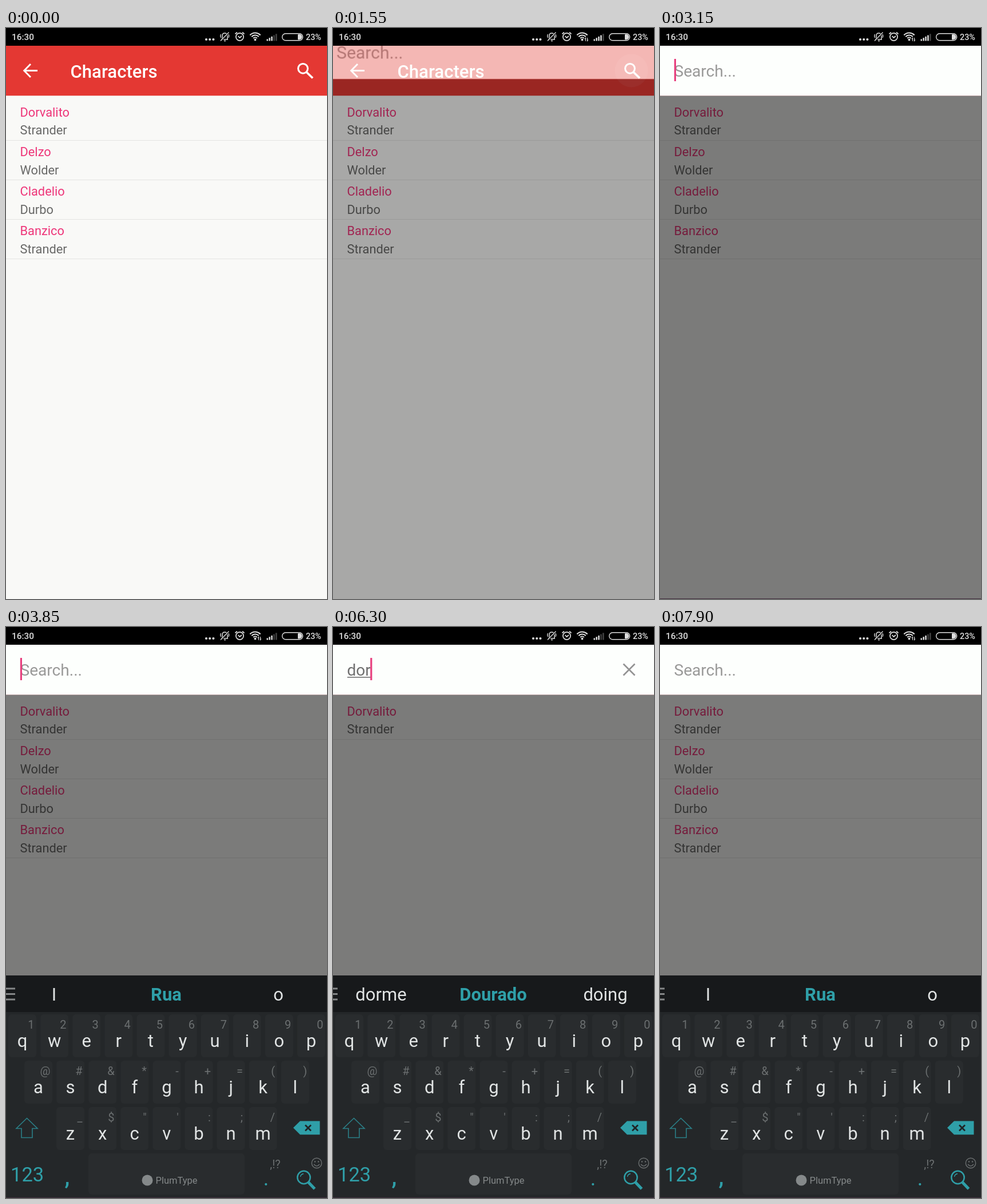
Write an HTML page with a canvas that moves like this. It is 561 px wide and 998 px high and loops after 8 s.

```html
<!DOCTYPE html>
<html lang="en">
<head>
<meta charset="utf-8">
<title>Character search</title>
<style>
  html, body { margin: 0; width: 100%; height: 100%; overflow: hidden; background: #000; }
  canvas { display: block; width: 561px; height: 998px; }
</style>
</head>
<body>
<canvas id="stage"></canvas>
<script>
const W = 561, H = 998, LOOP = 8000;
const BAR_TOP = 31, BAR_H = 87.3, BAR_MID = BAR_TOP + BAR_H / 2;
const dpr = window.devicePixelRatio || 1;

function setup(canvas, w, h) {
  canvas.width = w * dpr;
  canvas.height = h * dpr;
  const c = canvas.getContext('2d');
  c.scale(dpr, dpr);
  return c;
}

const screen = setup(document.getElementById('stage'), W, H);
const panel = setup(document.createElement('canvas'), W, 120);
let ctx = screen;

const TEAL = '#2f9fa8', PINK = '#ee3679', GREY = '#6b6f70';
const PEOPLE = [
  ['Dorvalito', 'Strander'],
  ['Delzo', 'Wolder'],
  ['Cladelio', 'Durbo'],
  ['Banzico', 'Strander']
];
// Each edit: time and resulting query
const EDITS = [[2700, ''], [4450, 'd'], [4900, 'do'], [5300, 'dor'],
               [6700, 'do'], [6950, 'd'], [7200, '']];
const WORDS = {
  '': ['I', 'Rua', 'o'],
  d: ['de', 'Da', 'do'],
  do: ['do', 'Dois', 'dos'],
  dor: ['dorme', 'Dourado', 'doing']
};
const KEY_ROWS = [
  { keys: 'qwertyuiop', hints: '1234567890', x: 28.5, y: 677 },
  { keys: 'asdfghjkl', hints: '@#&*-+=()', x: 56.5, y: 758 },
  { keys: 'zxcvbnm', hints: '_$"\':;/', x: 112.5, y: 839 }
];

const clamp = v => Math.max(0, Math.min(1, v));
const span = (t, from, to) => clamp((t - from) / (to - from));
const smooth = v => (1 - Math.cos(Math.PI * v)) / 2;

function rect(x, y, w, h, color) {
  ctx.fillStyle = color;
  ctx.fillRect(x, y, w, h);
}

function roundRect(x, y, w, h, r, color) {
  ctx.beginPath();
  ctx.roundRect(x, y, w, h, r);
  ctx.fillStyle = color;
  ctx.fill();
}

function disc(x, y, r, color) {
  ctx.beginPath();
  ctx.arc(x, y, r, 0, 7);
  ctx.fillStyle = color;
  ctx.fill();
}

function ring(x, y, r, color, width) {
  ctx.beginPath();
  ctx.arc(x, y, r, 0, 7);
  ctx.strokeStyle = color;
  ctx.lineWidth = width;
  ctx.stroke();
}

function stroke(d, color, width) {
  ctx.strokeStyle = color;
  ctx.lineWidth = width;
  ctx.stroke(new Path2D(d));
}

function text(s, x, y, size, color, weight = 400, align = 'left') {
  ctx.font = `${weight} ${size}px Roboto, sans-serif`;
  ctx.textAlign = align;
  ctx.fillStyle = color;
  ctx.fillText(s, x, y);
}

function drawStatus(t) {
  const c = '#dedede';
  const strong = t >= 650 && t < 3550;
  const traffic = (t >= 200 && t < 5000) || t >= 6650;
  rect(0, 0, W, BAR_TOP, '#000');
  text('16:30', 10, 21, 15.4, c, 500);
  for (let i = 0; i < 3; i++) disc(350 + i * 6.2, 20, 2.1, c);

  // Muted bell
  stroke('M376 20H388M378 20V14Q378 9 382 9Q387 9 387 14V20M381 22.5H384', c, 1.5);
  stroke('M375.5 23L390 7', '#000', 3);
  stroke('M375 22.5L389.5 7.5M375.5 11Q374 14 375.5 17M389 11Q390.5 14 389 17', c, 1.4);

  // Alarm
  ring(408.5, 15.5, 6.6, c, 1.7);
  stroke('M405.5 14L408.5 17L412 14M400.5 10.5L404 7.5M416.5 10.5L413 7.5', c, 1.7);

  // Wi-Fi
  for (const r of [4.5, 8.5, 12.5]) {
    ctx.beginPath();
    ctx.arc(435.5, 21, r, -Math.PI * 0.76, -Math.PI * 0.24);
    ctx.strokeStyle = c;
    ctx.lineWidth = 2.1;
    ctx.stroke();
  }
  disc(435.5, 20.5, 1.9, c);
  if (traffic) {
    rect(439, 16, 8, 8, '#000');
    stroke('M441.5 23V17.5L440 19.5M444.5 17V22.5L446 20.5', c, 1.1);
  }

  for (let i = 0; i < 5; i++) {
    const h = 3 + i * 2.3;
    const lit = i < (strong ? 4 : 3);
    rect(455.5 + i * 3.9, 22.5 - h, 2.5, h, lit ? c : '#444');
  }

  ctx.beginPath();
  ctx.roundRect(482.7, 9.7, 36, 12, 6);
  ctx.strokeStyle = c;
  ctx.lineWidth = 1.4;
  ctx.stroke();
  roundRect(510, 11, 7.5, 9.5, [1, 5, 5, 1], c);
  text('23%', 524, 21, 14.4, c, 500);
}

function drawToolbar(t) {
  rect(0, BAR_TOP, W, BAR_H, '#e43833');
  const grow = span(t, 1350, 1450);
  const fade = 1 - span(t, 1450, 1650);
  if (grow > 0 && fade > 0) {
    disc(521.5, 74.5, 14 + 15 * grow, `rgba(255,255,255,${0.12 * fade})`);
  }
  stroke('M55 74.5H32M43 63L31.7 74.5L43 86', '#fff', 2.9);
  text('Characters', 112.5, 87, 31.1, '#fff', 500);
  ring(519, 70.8, 8.4, '#fff', 3);
  stroke('M525 77L536 87.5', '#fff', 3.8);
}

function drawList(query) {
  PEOPLE.filter(([name]) => name.toLowerCase().includes(query)).forEach(([name, van], i) => {
    const y = i * 69.1;
    text(name, 24.5, 154.6 + y, 21.8, PINK);
    text(van, 24.5, 186.4 + y, 21.8, '#696968');
    rect(0, Math.round(195.5 + y), W, 1, '#e4e4e2');
  });
}

function drawField(query, cursor) {
  ctx.clearRect(0, 0, W, 120);
  rect(0, BAR_TOP, W, BAR_H, '#fdfffd');
  let width = 0;
  if (query) {
    text(query, 24.5, 85, 28.1, '#707070');
    width = ctx.measureText(query).width;
    rect(25, 87, width, 1.6, '#707070');
    stroke('M507.5 64.5L527.5 84.5M527.5 64.5L507.5 84.5', '#929292', 2.6);
  } else {
    text('Search...', 24.5, 85, 28.1, '#9a9a99');
  }
  if (cursor) rect(24.8 + Math.max(0, width - 1), 54, 3.2, 39, '#e8407f');
}

function drawSearch(p, query, cursor) {
  const mid = BAR_MID - 90 * (1 - p);
  const scale = 1 + 0.2 * (1 - p);
  const bottom = mid + BAR_H / 2 * scale;
  rect(0, bottom, W, H - bottom, `rgba(0,0,0,${0.505 * p})`);

  // The field fades as one layer, text included
  ctx = panel;
  drawField(query, cursor);
  ctx = screen;
  ctx.save();
  ctx.globalAlpha = p;
  ctx.translate(W / 2, mid);
  ctx.scale(scale, scale);
  ctx.translate(-W / 2, -BAR_MID);
  ctx.drawImage(panel.canvas, 0, 0, W, 120);
  ctx.restore();
}

function drawKeys() {
  for (const row of KEY_ROWS) {
    [...row.keys].forEach((key, i) => {
      const x = row.x + i * 56.1;
      roundRect(x - 24.5, row.y, 49, 75, 6, '#292c2e');
      text(key, x, row.y + 57, 31, '#e1e4e4', 400, 'center');
      text(row.hints[i], x + 21, row.y + 25, 20, GREY, 400, 'right');
    });
  }
  roundRect(144, 920, 273, 72, 6, '#292c2e');
  disc(247, 967, 9.5, '#85898a');
  text('PlumType', 261.5, 973, 16.5, '#85898a');

  stroke('M36.5 858.5L55 876.5H46V892.5H27V876.5H18Z', '#2b7f87', 1.6);
  ctx.fillStyle = TEAL;
  ctx.fill(new Path2D('M502 875.3L514 863.5H548.5V887.3H514Z'));
  stroke('M523 870.5L533 880.5M533 870.5L523 880.5', '#202426', 2.8);

  text('123', 8, 969, 34.5, TEAL);
  text(',', 107, 975, 40, TEAL, 500, 'center');
  text('.', 454.5, 976, 36, TEAL, 400, 'center');
  text(',!?', 470.5, 946, 20, GREY, 400, 'center');

  ring(543, 937, 8.7, GREY, 1.4);
  disc(540, 934.5, 1.2, GREY);
  disc(546, 934.5, 1.2, GREY);
  stroke('M538 939Q543 945 548 939', GREY, 1.4);

  ring(520.5, 962, 11.2, TEAL, 2.5);
  stroke('M514.5 961Q515 956.5 520 955.5', TEAL, 1.3);
  stroke('M528.5 970.5L539.5 982', TEAL, 5);
}

function drawKeyboard(t, query) {
  const slide = 1 - (1 - span(t, 3170, 3430)) ** 2;
  if (slide <= 0) return;
  ctx.save();
  ctx.translate(0, 389 * (1 - slide));
  rect(0, 609, W, 389, '#242729');
  rect(0, 609, W, 64, '#17191b');
  const menu = t < 4450 ? 16 : 8;
  for (let i = 0; i < 3; i++) rect(0, 630.5 + i * 9.5, menu, 3, '#858788');
  WORDS[query].forEach((word, i) => {
    const main = i === 1;
    text(word, 84 + i * 196, 652.5, 31, main ? TEAL : '#e1e4e4', main ? 700 : 400, 'center');
  });
  drawKeys();
  ctx.restore();
}

function draw(t) {
  const edit = EDITS.filter(([at]) => at <= t).pop();
  const query = edit ? edit[1] : '';
  const cursor = edit && Math.floor((t - edit[0]) / 500) % 2 === 0;
  const open = smooth(span(t, 1327, 1706));

  rect(0, 0, W, H, '#f9f9f7');
  drawToolbar(t);
  drawList(query);
  if (open > 0) drawSearch(open, query, cursor);
  drawKeyboard(t, query);
  if (t >= 2650) rect(0, 997, W, 1, '#43303f');
  drawStatus(t);
}

const start = performance.now();
function tick() {
  draw((performance.now() - start) % LOOP);
  requestAnimationFrame(tick);
}
tick();
</script>
</body>
</html>
```
